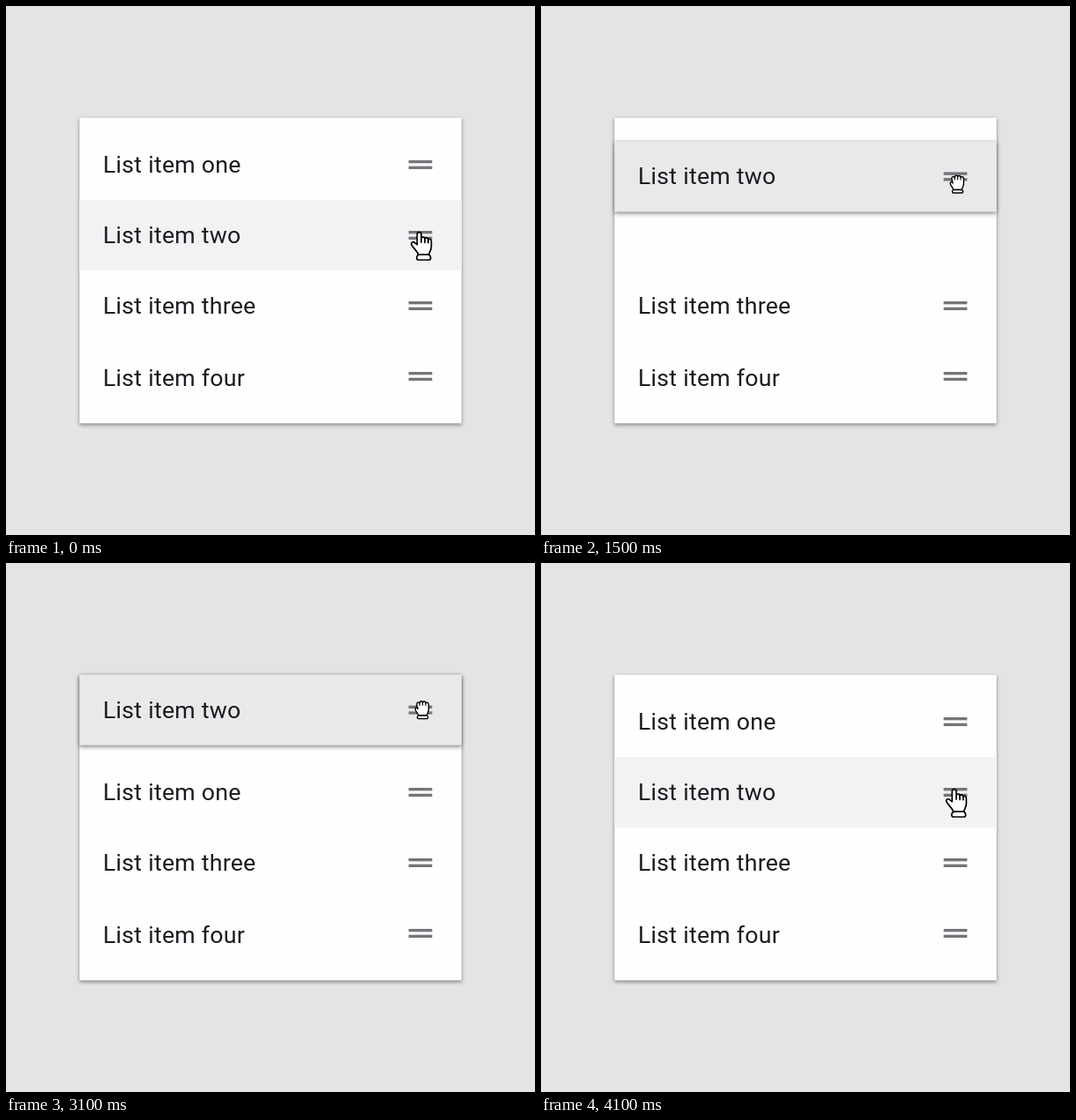
Write an HTML page that moves like this. It is 600x600 px and loops after 4.5 s.

```html
<!DOCTYPE html>
<html lang="en">
<head>
<meta charset="utf-8">
<title>Reorder list</title>
<style>
  html, body { margin: 0; width: 100%; height: 100%; overflow: hidden; background: #e5e3e6; }
  svg { display: block; width: 100%; height: 100%; }
  text { font: 26.67px Roboto, sans-serif; letter-spacing: .25px; fill: #1c1b1f; }
  .bar { fill: #757478; }
  .card { fill: #fffdff; filter: drop-shadow(0 2px 2.2px rgba(0,0,0,.36)) drop-shadow(0 0 1.5px rgba(0,0,0,.12)); }
  .lift { fill: #eae8ea; filter: drop-shadow(0 2px 2.4px rgba(0,0,0,.4)) drop-shadow(0 0 1.8px rgba(0,0,0,.14)); }
  .hand { fill: #fff; stroke: #000; stroke-width: 1.7; stroke-linejoin: round; stroke-linecap: round; }
</style>
</head>
<body>
<svg viewBox="0 0 600 600">
  <defs>
    <g id="grip" class="bar">
      <rect x="456.67" y="-5" width="26.67" height="3.33"/>
      <rect x="456.67" y="1.67" width="26.67" height="3.33"/>
    </g>
  </defs>
  <rect class="card" x="83.33" y="126.67" width="433.33" height="346.67"/>
  <g id="one"><text x="110" y="9">List item one</text><use href="#grip"/></g>
  <g transform="translate(0 340)"><text x="110" y="9">List item three</text><use href="#grip"/></g>
  <g transform="translate(0 420)"><text x="110" y="10.5">List item four</text><use href="#grip"/></g>
  <g id="two">
    <rect x="83.33" y="-40" width="433.33" height="80" fill="#f3f1f4"/>
    <rect id="lift" class="lift" x="83.33" y="-40" width="433.33" height="80"/>
    <text x="110" y="9">List item two</text><use href="#grip"/>
  </g>
  <!-- Cursors, with the centre of the closed hand at y = 0 -->
  <g id="cursor" class="hand">
    <g id="point">
      <path d="M466.3 2.5V-8.7C466.3-12.2 471-12.2 471-8.7V-4C471.3-6.5 475-6.4 475-3.7C475.6-5.8 478.8-5.4 478.9-3C479.8-4.4 482.4-3.7 482.4-1.2V5C482.4 9 480 10.5 479.7 14H467.8C467.3 11 463.5 8.5 460.2 3.2C458.4.3 461.8-1.2 463.6.6Z"/>
      <path d="M471-4V0M475-3.7V.3M478.9-3V.6" fill="none"/>
      <path d="M467.8 14C465 16 465 20 468 20H479.6C482.4 20 482.4 16 479.7 14Z"/>
    </g>
    <g id="grab" stroke-width="1.4">
      <path d="M467-.5L465.9-5.5C465.5-8.2 468.6-8.7 469.2-6.6C469.2-10 472.4-10 472.6-7.5C473-9.7 476-9.4 476-7C476.7-8.4 479.4-8 479.4-5.4V0C479.4 3 477.6 4.5 477.3 7H467.8C467.6 4.8 464.6 2.5 464.2 0C464-2 465.6-2.5 467-1.5Z"/>
      <path d="M469.2-6.6V-4.5M472.6-7.5V-4.8M476-7V-4.5" fill="none" stroke-width="1.1"/>
      <path d="M467.8 7C466 8 466 10.6 468 10.6H477.2C479.2 10.6 479.2 8 477.3 7Z"/>
    </g>
  </g>
</svg>
<script>
const LOOP = 4500, STEP = 100;
const $ = id => document.getElementById(id);
const parts = Object.fromEntries(['one', 'two', 'lift', 'cursor', 'point', 'grab'].map(id => [id, $(id)]));

// CSS-style cubic-bezier, solved by bisection
const bezier = (x1, y1, x2, y2) => x => {
  const at = (a, b, u) => 3 * a * u * (1 - u) ** 2 + 3 * b * u * u * (1 - u) + u ** 3;
  let lo = 0, hi = 1;
  for (let i = 0; i < 24; i++) {
    const mid = (lo + hi) / 2;
    if (at(x1, x2, mid) < x) lo = mid; else hi = mid;
  }
  return at(y1, y2, lo);
};
const standard = bezier(.4, 0, .2, 1);
const linear = x => x;

// Each row: start, end, target value, easing
const tracks = {
  cursor: { from: 268, moves: [[1248, 1848, 166, standard], [3273, 3833, 268, standard]] },
  two: { from: 260, moves: [
    [1248, 1848, 158, standard], [1860, 2100, 166.67, standard],
    [3273, 3833, 268.33, standard], [3920, 4100, 260, standard]] },
  one: { from: 180, moves: [[1420, 1760, 260, standard], [3460, 3860, 180, standard]] },
  lift: { from: 0, moves: [
    [420, 800, 1, linear], [1820, 2100, 0, linear],
    [2620, 3100, 1, linear], [3900, 4100, 0, linear]] }
};

function value({ from, moves }, t) {
  let v = from;
  for (const [start, end, to, ease] of moves) {
    if (t < start) break;
    v += (to - v) * (t >= end ? 1 : ease((t - start) / (end - start)));
  }
  return v;
}

function draw(time) {
  const t = Math.floor(time % LOOP / STEP) * STEP;
  for (const id of ['one', 'two', 'cursor'])
    parts[id].setAttribute('transform', `translate(0 ${value(tracks[id], t).toFixed(2)})`);
  parts.lift.style.opacity = value(tracks.lift, t);
  const held = (t >= 500 && t < 1900) || (t >= 2700 && t < 4000);
  parts.point.style.display = held ? 'none' : '';
  parts.grab.style.display = held ? '' : 'none';
}

const begin = performance.now();
function tick() {
  draw(performance.now() - begin);
  requestAnimationFrame(tick);
}
tick();
</script>
</body>
</html>
```
